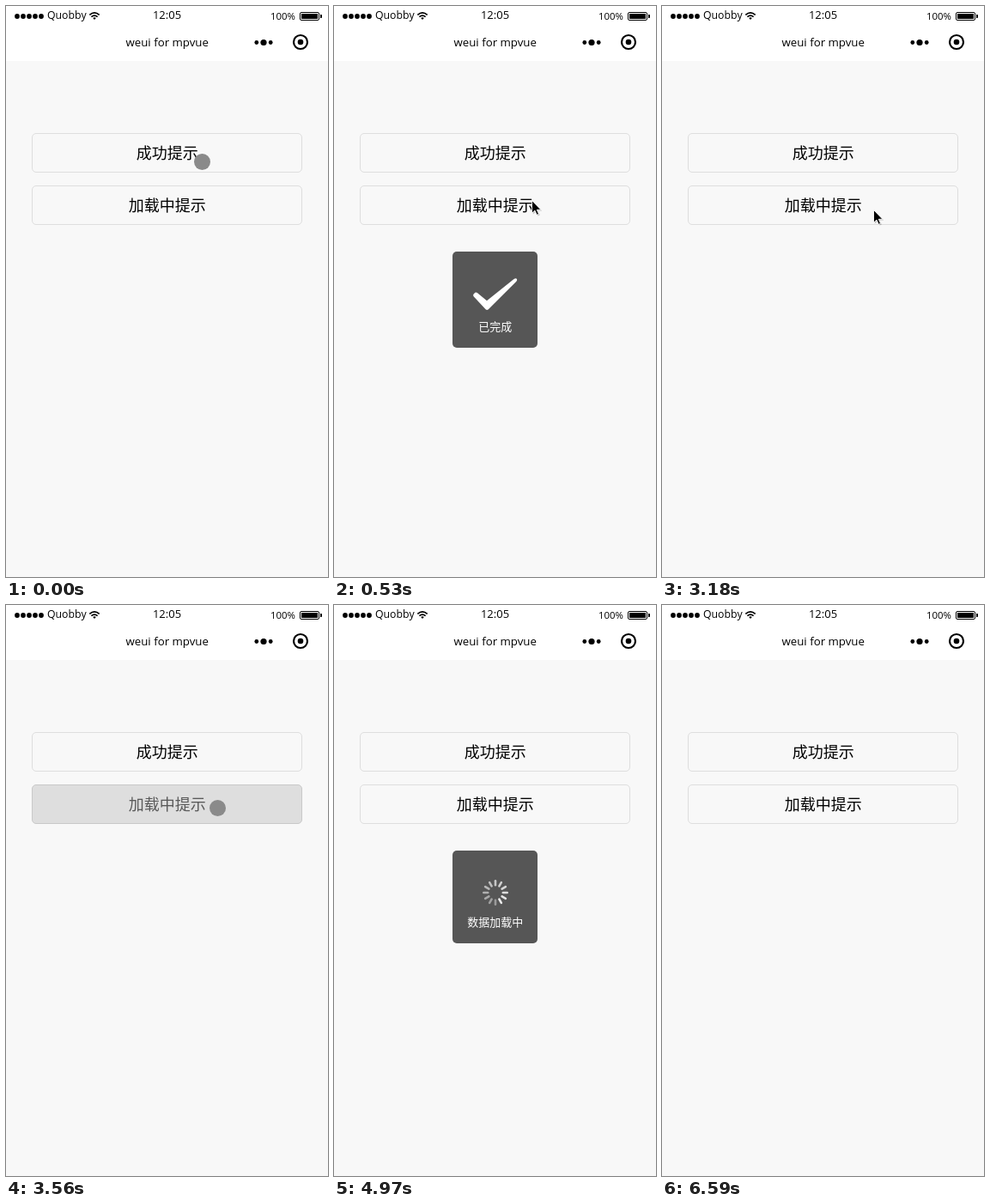
Write an HTML page that moves like this. It is 375 px wide and 665 px high and loops after 6740 ms.

```html
<!DOCTYPE html>
<html lang="zh-CN">
<head>
<meta charset="utf-8">
<title>Toast demo</title>
<style>
  html, body { margin: 0; width: 100%; height: 100%; overflow: hidden; background: #f8f8f8; }
  svg { display: block; width: 375px; height: 665px; }
  text { font-family: "Open Sans", "Noto Sans", sans-serif; }
  .cjk { font-family: "Noto Sans CJK SC", "Noto Sans CJK", sans-serif; text-anchor: middle; }
  .button rect { fill: #f8f8f8; stroke: #dedede; }
  .button text { font-size: 18px; }
  .button.pressed rect { fill: #dedede; stroke: #c9c9c9; }
  .button.pressed text { fill: rgba(0, 0, 0, .6); }
  .toast rect { fill: #565656; }
  .toast text { font-size: 13px; fill: #fff; }
</style>
</head>
<body>
<svg viewBox="0 0 375 665">
  <rect width="375" height="665" fill="#f8f8f8"/>
  <rect width="375" height="64" fill="#fff"/>

  <g id="signal"></g>
  <text x="48" y="15.3" font-size="12.3">Quobby</text>
  <g fill="none" stroke="#000" stroke-width="1.7">
    <path d="M97.3 10.4Q103 5.4 108.7 10.4M99.4 12.7Q103 9.6 106.6 12.7"/>
    <path d="M101.2 14L103 16L104.8 14Q103 12.7 101.2 14Z" fill="#000" stroke="none"/>
  </g>
  <text x="187.5" y="15" font-size="13" text-anchor="middle">12:05</text>
  <text x="308" y="16" font-size="11.4">100%</text>
  <rect x="342.5" y="7.5" width="22" height="9" rx="1.5" fill="none" stroke="#000"/>
  <rect x="344" y="9" width="19" height="6"/>
  <path d="M366 10h1q1 0 1 1v2q0 1-1 1h-1z"/>

  <text x="187.7" y="47" font-size="13.25" text-anchor="middle">weui for mpvue</text>
  <circle cx="291.8" cy="42.5" r="2.4"/>
  <circle cx="300" cy="42.5" r="3.6"/>
  <circle cx="308.2" cy="42.5" r="2.4"/>
  <circle cx="343" cy="42" r="8" fill="none" stroke="#000" stroke-width="2.2"/>
  <circle cx="343" cy="42" r="3.3"/>

  <g class="button" id="successButton">
    <rect x="30.5" y="148.5" width="314" height="45" rx="4.5"/>
    <text class="cjk" x="187.7" y="178">成功提示</text>
  </g>
  <g class="button" id="loadingButton">
    <rect x="30.5" y="209.5" width="314" height="45" rx="4.5"/>
    <text class="cjk" x="187.7" y="239">加载中提示</text>
  </g>

  <g class="toast" id="successToast">
    <rect x="138" y="286" width="99" height="112" rx="5"/>
    <path fill="#fff" d="M162.8 335.2L164.4 333.8Q165.4 333 166.8 334L178 343.2L209.5 317.9Q212 316.6 213 318Q213.6 319.2 212.4 320.8L179.8 353.2Q178.2 354.6 176.6 353.2L162.6 338.2Q161.4 336.6 162.8 335.2Z"/>
    <text class="cjk" x="187.7" y="378">已完成</text>
  </g>
  <g class="toast" id="loadingToast">
    <rect x="138" y="286" width="99" height="108" rx="5"/>
    <g id="spinner"></g>
    <text class="cjk" x="187.7" y="374">数据加载中</text>
  </g>

  <circle id="touch" r="9.5" fill="#8a8a8a"/>
  <g id="arrow">
    <path d="M0 0V14.8L3.4 11.6L5.7 16.8L8 15.8L5.8 10.8H10.4Z" transform="translate(1.3 1.3)" fill="#000" opacity=".22"/>
    <path d="M0 0V14.8L3.4 11.6L5.7 16.8L8 15.8L5.8 10.8H10.4Z" stroke="#fff" stroke-width=".9"/>
  </g>
</svg>
<script>
const LOOP = 6740;
const byId = id => document.getElementById(id);

function add(parent, tag, attributes) {
  const node = document.createElementNS("http://www.w3.org/2000/svg", tag);
  for (const [name, value] of Object.entries(attributes)) node.setAttribute(name, value);
  parent.append(node);
}

for (let i = 0; i < 5; i++) add(byId("signal"), "circle", { cx: 13 + 7 * i, cy: 12, r: 2.9 });

for (let i = 0; i < 12; i++) {
  const shade = i ? 146 + 7.5 * i : 235;
  add(byId("spinner"), "rect", {
    x: -1.3, y: -15, width: 2.6, height: 7.5, rx: 1.3,
    transform: `rotate(${30 * i})`,
    style: `fill:rgb(${shade},${shade},${shade})`
  });
}

// The screen refreshes in bursts: [first, last, count].
const bursts = [
  [0, 60, 2], [230, 530, 5], [1540, 1770, 4], [3180, 3330, 2], [3560, 4190, 9],
  [4270, 4420, 3], [4570, 4570, 1], [4740, 5350, 9], [5430, 5810, 6], [5960, 6590, 9]
];
const ticks = bursts.flatMap(([first, last, count]) =>
  Array.from({ length: count }, (_, i) =>
    Math.round((first + (last - first) * i / Math.max(1, count - 1)) / 10) * 10));

// Pointer keys: [time, x, y]
const pointerPaths = [
  [[450, 229, 204], [530, 230.5, 226.5]],
  [[1460, 230.5, 226.5], [1770, 246.5, 237.5], [3330, 246.5, 237.5]],
  [[3800, 252, 300], [3950, 272, 574], [4030, 272, 574]]
];

function pointerAt(t) {
  const path = pointerPaths.find(p => t >= p[0][0] && t < p[p.length - 1][0]);
  if (!path) return t >= 530 && t < 1460 ? [230.5, 226.5] : null;
  const next = path.findIndex(key => key[0] > t);
  const [t0, x0, y0] = path[next - 1], [t1, x1, y1] = path[next];
  const k = (t - t0) / (t1 - t0);
  return [x0 + (x1 - x0) * k, y0 + (y1 - y0) * k];
}

const within = (t, from, to) => t >= from && t < to;
const show = (id, visible) => byId(id).style.display = visible ? "" : "none";
const move = (id, x, y, angle = 0) =>
  byId(id).setAttribute("transform", `translate(${x} ${y}) rotate(${angle})`);

function render(time) {
  const t = ticks.filter(tick => tick <= time).pop();

  byId("successButton").classList.toggle("pressed", within(t, 230, 380));
  byId("loadingButton").classList.toggle("pressed", within(t, 3560, 3800));
  show("successToast", within(t, 300, 3180));
  show("loadingToast", within(t, 3710, 6590));

  const head = Math.floor((t - 4030) * 12 / 1000 + 6.4);
  move("spinner", 188, 335, 30 * head);

  const firstTouch = t < 60;
  show("touch", firstTouch || within(t, 3330, 3640));
  move("touch", firstTouch ? 228.5 : 246.5, firstTouch ? 181.5 : 236.5);

  const pointer = pointerAt(t);
  show("arrow", pointer);
  if (pointer) move("arrow", ...pointer);
}

const start = performance.now();
function frame() {
  render((performance.now() - start) % LOOP);
  requestAnimationFrame(frame);
}
frame();
</script>
</body>
</html>
```
